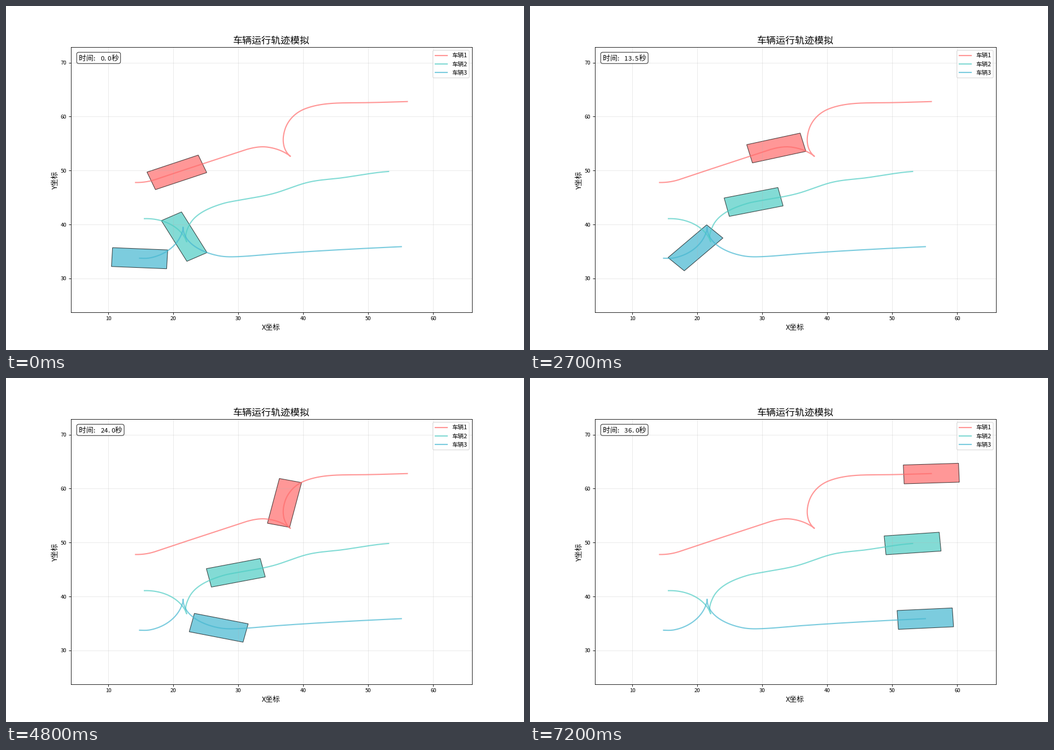
A matplotlib script that plays this animation: 917x611 px, repeating every 7.3 s.

```python
import numpy as np
import matplotlib.pyplot as plt
from matplotlib.animation import FuncAnimation
from matplotlib.lines import Line2D
from matplotlib.patches import FancyBboxPatch, Polygon
from matplotlib.transforms import Affine2D

W, H, DPI = 917, 611, 76.4
FRAMES, INTERVAL = 73, 100
XLIM, YLIM = (4.23, 65.98), (23.75, 72.84)
LENGTH, WIDTH = 8.5, 3.5
EM = 12 * DPI / 72
COLORS = ["#FF6B6B", "#4ECDC4", "#45B7D1"]

# Key poses of each car: tick, x, y, heading in degrees.
# A car drives forward up to its turn, then backs away from it.
CAR_1 = dict(turn=7, poses=[
    (-8, 14.2, 47.78, -1), (-4, 17.25, 48.33, 21.8), (0, 20.55, 49.66, 21.8),
    (10, 27.94, 52.59, 21.8), (16, 29.89, 53.37, 21.8), (21, 30.27, 53.52, 21.8),
    (32, 34.48, 54.34, -9), (40.5, 38.02, 52.63, -44), (45.5, 36.91, 55.71, -90),
    (48, 37.11, 57.34, -102.5), (56, 40.28, 61.45, -155.1),
    (64, 47.62, 62.55, -179.7), (72, 56.0, 62.78, -177.9)])
CAR_2 = dict(turn=2, poses=[
    (-10, 15.56, 41.08, 2), (0, 21.68, 37.75, -62.5), (2.5, 22.07, 36.79, -69),
    (10, 22.42, 39.8, -112), (21, 27.75, 43.92, -160.5), (32, 29.07, 44.27, -167),
    (48, 29.62, 44.39, -167.2), (56, 35.26, 45.69, -162.5),
    (61.4, 40.36, 47.7, -162), (64.9, 44.27, 48.42, -174),
    (72, 53.12, 49.82, -175.4)])
CAR_3 = dict(turn=3, poses=[
    (16, 14.82, 33.75, -2.8), (21, 16.47, 33.82, 13.5), (32, 21.4, 38.66, 75.6),
    (33.6, 21.51, 39.5, 90), (48, 26.99, 34.2, 166.9), (50.5, 29.07, 34.01, 181),
    (56, 35.89, 34.58, 185), (72, 55.08, 35.89, 183.2)])


def hermite(p, q, m, n, u):
    """Cubic from p to q with end slopes m and n, for u from 0 to 1."""
    return ((1 + 2 * u) * (1 - u) ** 2 * p + u * (1 - u) ** 2 * m
            + u * u * (3 - 2 * u) * q + u * u * (u - 1) * n)


def direction(degrees):
    a = np.radians(degrees)
    return np.array([np.cos(a), np.sin(a)])


def curve(p, q, start, end, gear):
    """Near-circular curve between two poses: positions and unit tangents."""
    reach = np.hypot(*(q - p)) / np.cos(np.radians(end - start) / 4) ** 2
    m, n = gear * reach * direction(start), gear * reach * direction(end)
    pos = hermite(p, q, m, n, np.linspace(0, 1, 80)[:, None])
    tan = np.gradient(pos, axis=0, edge_order=2)
    return pos, tan / np.hypot(*tan.T)[:, None]


def monotone_slopes(t, s):
    """Speeds at the keys that keep the eased distance from running back."""
    d = np.diff(s) / np.diff(t)
    return np.concatenate([d[:1], 2 * d[:-1] * d[1:] / (d[:-1] + d[1:]), d[-1:]])


class Car:
    def __init__(self, ax, color, poses, turn):
        poses = np.array(poses, float)
        self.ticks, xy, heading = poses[:, 0], poses[:, 1:3], poses[:, 3]
        parts = [curve(xy[i], xy[i + 1], heading[i], heading[i + 1],
                       1 if i < turn else -1) for i in range(len(poses) - 1)]
        self.pos = np.vstack([pos for pos, _ in parts])
        self.tan = np.vstack([tan for _, tan in parts])
        self.arc = np.append(0, np.cumsum(np.hypot(*np.diff(self.pos, axis=0).T)))
        self.dist = np.append(self.arc[::80], self.arc[-1])
        self.speed = monotone_slopes(self.ticks, self.dist)
        ax.plot(*self.pos.T, color=color, lw=2, alpha=0.7)
        self.body = ax.add_patch(Polygon(np.zeros((4, 2)), fc=color, ec="black",
                                         lw=1, alpha=0.7))

    def travelled(self, tick):
        t, s, v = self.ticks, self.dist, self.speed
        tick = max(tick, t[0])
        i = min(np.searchsorted(t, tick, side="right") - 1, len(t) - 2)
        h = t[i + 1] - t[i]
        return hermite(s[i], s[i + 1], h * v[i], h * v[i + 1], (tick - t[i]) / h)

    def move(self, tick):
        s = self.travelled(tick)
        center = np.array([np.interp(s, self.arc, c) for c in self.pos.T])
        along = self.tan[np.argmin(abs(self.arc - s))]
        a = along * LENGTH / 2
        b = np.array([-along[1], along[0]]) * WIDTH / 2
        self.body.set_xy([center + a + b, center + a - b,
                          center - a - b, center - a + b])


plt.rcParams["font.family"] = "Noto Sans CJK JP"
fig, ax = plt.subplots(figsize=(W / DPI, H / DPI), dpi=DPI)
fig.subplots_adjust(left=0.125, right=0.9, bottom=0.11, top=0.88)
# Pixels from the top left corner
stage = Affine2D().scale(1 / W, -1 / H).translate(0, 1) + fig.transFigure


def label(x, y, text, size, **kw):
    return fig.text(x, y, text, fontsize=size, transform=stage, **kw)


def round_box(x, y, w, h, pad, radius, edge):
    style = f"round,pad={pad},rounding_size={radius}"
    return fig.add_artist(FancyBboxPatch((x, y), w, h, boxstyle=style, fc="white",
                                         ec=edge, alpha=0.8, transform=stage))


ax.set(xlim=XLIM, ylim=YLIM, xticks=range(10, 61, 10), yticks=range(30, 71, 10))
ax.tick_params(labelsize=9)
ax.grid(True, alpha=0.3)
ax.set_title("车辆运行轨迹模拟", fontsize=16)
label(469.5, 574.8, "X坐标", 12, ha="center")
label(90.8, 309.5, "Y坐标", 12, ha="center", rotation=90, rotation_mode="anchor")

cars = [Car(ax, color, **spec)
        for color, spec in zip(COLORS, [CAR_1, CAR_2, CAR_3])]

# Legend
round_box(755.7, 78.7, 64.3, 49, 0, 2.1, "0.8")
for i, color in enumerate(COLORS):
    y = 87.7 + 15.2 * i
    fig.add_artist(Line2D([760, 781.2], [y, y], color=color, lw=2, alpha=0.7,
                          transform=stage))
    label(789.7, y + 3.6, f"车辆{i + 1}", 10)

# Clock: full-width characters take one em, the others half an em
CLOCK_X, CLOCK_Y = 128.9, 96.8
clock_box = round_box(CLOCK_X, 86, EM, 12.4, 3.8, 3.8, "black")
clock = [label(CLOCK_X, CLOCK_Y, "", 12) for _ in range(9)]


def set_clock(seconds):
    x = CLOCK_X
    for cell, char in zip(clock, f"时间: {seconds:.1f}秒".ljust(len(clock))):
        wide = ord(char) > 255
        cell.set(text=char.strip(), x=x, fontsize=12 if wide else 10.8)
        x += EM if wide else EM / 2
        if char == "秒":
            clock_box.set_width(x - CLOCK_X)


def update(frame):
    for car in cars:
        car.move(frame)
    set_clock(frame * 0.5)
    return []


anim = FuncAnimation(fig, update, frames=FRAMES, interval=INTERVAL,
                     repeat=True, repeat_delay=0, blit=False)
plt.show()
```
